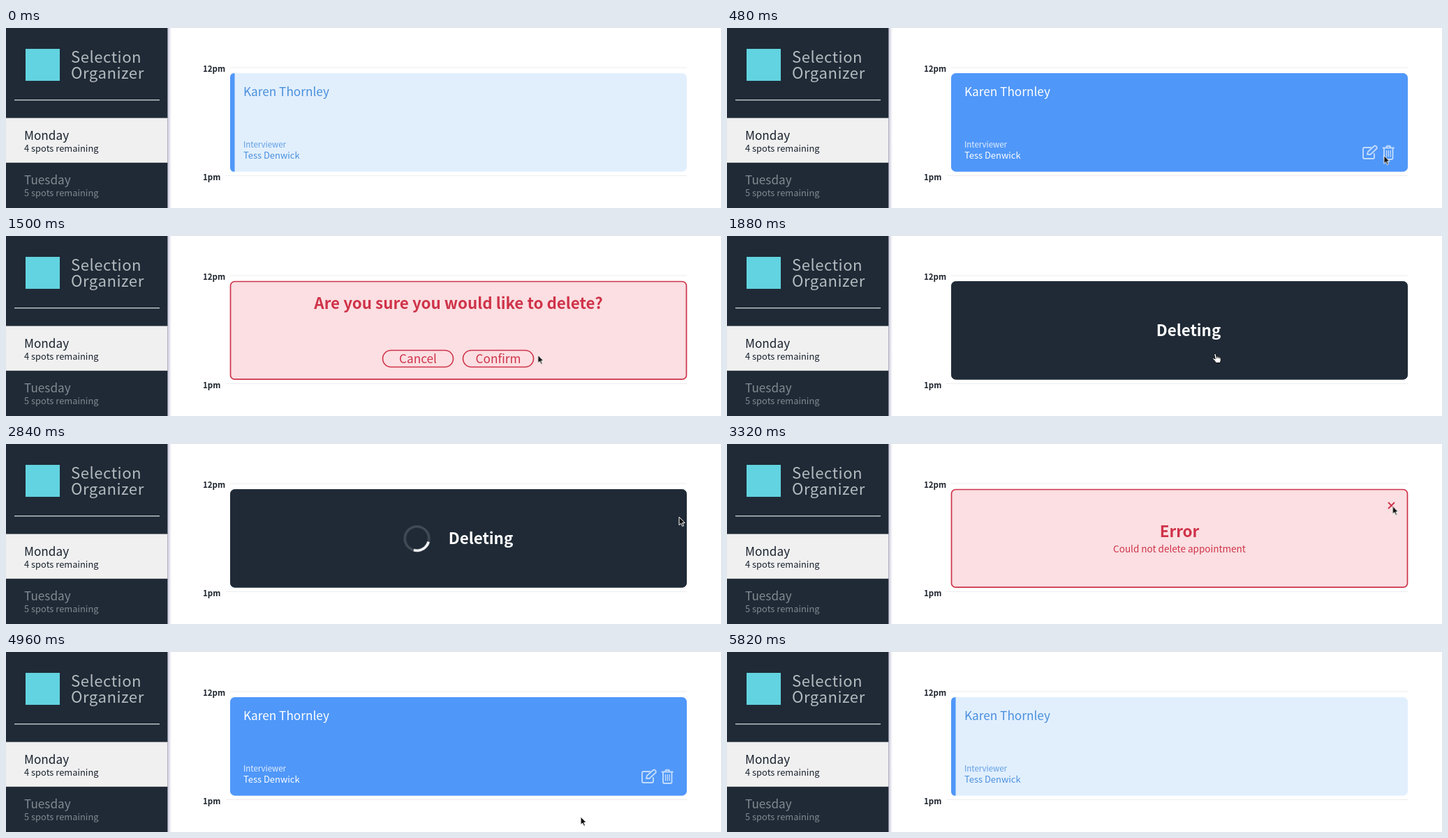
Write an HTML page that moves like this. It is 1024 px wide and 259 px high and loops after 5840 ms.

```html
<!DOCTYPE html>
<html lang="en">
<head>
<meta charset="utf-8">
<title>Interview booking</title>
<style>
  html, body { margin: 0; width: 100%; height: 100%; overflow: hidden; background: #fff; }
  svg { display: block; width: 100vw; height: 100vh; }
  text { font-family: "Noto Sans CJK JP", "Noto Sans CJK SC", "Noto Sans CJK", "Open Sans", sans-serif; font-size: 17.2px; }
  .brand { font-size: 22.2px; font-weight: 300; letter-spacing: .5px; fill: #b4babf; }
  .day { font-size: 17.2px; }
  .spots { font-size: 12.9px; }
  .hour { font-size: 11.5px; font-weight: 700; fill: #1b222b; }
  .title { font-size: 22.35px; font-weight: 600; }
  .label { font-size: 11.45px; font-weight: 300; }
  .person { font-size: 12.95px; }
  .mid { text-anchor: middle; }
  .rest { fill: #4a8fdd; }
  .hover { fill: #fff; }
  .alert { fill: #cf3349; }
  .icon { fill: none; stroke: #fff; stroke-width: 1.9; stroke-linejoin: round; stroke-linecap: round; opacity: .65; }
  .pointer { stroke-width: 1; stroke-linejoin: round; }
  #stage > g { opacity: 0; }
</style>
</head>
<body>
<svg viewBox="0 0 1024 259" preserveAspectRatio="none">
  <defs>
    <linearGradient id="shade">
      <stop offset="0" stop-color="#c8c5da"/>
      <stop offset="1" stop-color="#fff"/>
    </linearGradient>
  </defs>

  <rect x="231" width="6" height="259" fill="url(#shade)"/>
  <rect width="231.4" height="259" fill="#1f2a36"/>
  <rect x="28" y="30" width="49" height="46" fill="#62d3e0"/>
  <text class="brand" x="93" y="50">Selection</text>
  <text class="brand" x="93" y="73">Organizer</text>
  <path d="M12 103.6H220" stroke="#d5d9dd" stroke-width="1.3"/>
  <rect y="129.5" width="231.4" height="64.3" fill="#f0f0f0"/>
  <g fill="#18222e">
    <text class="day" x="26" y="161">Monday</text>
    <text class="spots" x="26" y="178">4 spots remaining</text>
  </g>
  <g fill="#828990">
    <text class="day" x="26" y="225">Tuesday</text>
    <text class="spots" x="26" y="242">5 spots remaining</text>
  </g>

  <text class="hour" x="282" y="62.5">12pm</text>
  <text class="hour" x="282" y="218.5">1pm</text>
  <path d="M321 57H975M315 212.5H975" stroke="#ececec"/>

  <g id="stage"></g>
</svg>

<script>
const LOOP = 5840;
const stage = document.getElementById('stage');

const card = (fill, border) =>
  `<rect x="321.5" y="65.5" width="653" height="140.7" rx="6" fill="${fill}"
    stroke="${border || fill}" stroke-width="${border ? 1.7 : 1}"/>`;

const booking = state => `<g class="${state}">
  <text x="340" y="98">Karen Thornley</text>
  <text class="label" x="340" y="171.7" opacity=".85">Interviewer</text>
  <text class="person" x="340" y="188">Tess Denwick</text></g>`;

const button = (x, label) => `
  <rect x="${x}" y="164.5" width="101" height="24" rx="12" fill="none" stroke="#cf3349" stroke-width="1.6"/>
  <text class="alert mid" x="${x + 50.5}" y="183">${label}</text>`;

function add(markup) {
  const g = document.createElementNS('http://www.w3.org/2000/svg', 'g');
  g.innerHTML = markup;
  stage.append(g);
  return g;
}

const play = (el, frames, duration = LOOP) =>
  el.animate(frames, { duration, iterations: Infinity });

// Visible only inside the given [from, to] spans, with hard switches.
function show(el, ...spans) {
  const on = t => spans.some(([from, to]) => t >= from && t < to) ? 1 : 0;
  const times = [...new Set([0, ...spans.flat(), LOOP])];
  play(el, times.map(t => ({ offset: t / LOOP, opacity: on(t % LOOP), easing: 'step-end' })));
}

const T = { enter: 300, ask: 760, remove: 1850, spin: 1930, fail: 3300, back: 3920, icons: 3990, leave: 4990 };

show(add(card('#e1effd') +
  '<path d="M327.5 65H327Q321 65 321 71V200.7Q321 206.7 327 206.7H327.5Z" fill="#4f97f8"/>' +
  booking('rest')), [0, T.enter], [T.leave, LOOP]);

show(add(card('#4f97f9') + booking('hover')), [T.enter, T.ask], [T.back, T.leave]);

show(add(`<g class="icon">
  <path d="M922 172H913Q911 172 911 174V186Q911 188 913 188H925Q927 188 927 186V181"/>
  <path d="M917 182L918 178L927 169.8Q928.5 169 930 170.5T930.5 173.5L921.5 182Z"/>
  <path d="M939.5 172.5H955M944 172L945 169.8H949.5L950.5 172M941 173V187Q941 189 943 189H951.5Q953.5 189 953.5 187V173"/>
  <path d="M944.5 176.5V185M947.3 176.5V185M950.1 176.5V185" stroke-width="1.4"/></g>`),
  [T.enter, T.ask], [T.icons, T.leave]);

show(add(card('#fbdfe2', '#cf3349') +
  '<text class="title alert mid" x="648" y="105">Are you sure you would like to delete?</text>' +
  button(539.5, 'Cancel') + button(654.5, 'Confirm')), [T.ask, T.remove]);

show(add(card('#1f2a36')), [T.remove, T.fail]);
const deleting = x => add(`<text class="title hover mid" x="${x}" y="144">Deleting</text>`);
show(deleting(661), [T.remove, T.spin]);
show(deleting(680), [T.spin, T.fail]);

const spinner = add(`<g transform="translate(588.5 136)" fill="none" stroke-width="3.6">
  <circle r="17.3" stroke="#414b56"/>
  <path d="M17.3 0A17.3 17.3 0 0 1 0 17.3" stroke="#fff"/></g>`);
show(spinner, [T.spin, T.fail]);
const turn = 600, phase = 15 - 2840 % turn / turn * 360;
play(spinner.querySelector('path'),
  [{ transform: `rotate(${phase}deg)` }, { transform: `rotate(${phase + 360}deg)` }], turn);

show(add(card('#fbdfe2', '#cf3349') +
  '<text class="title alert mid" x="648" y="134">Error</text>' +
  '<text class="alert mid" x="648" y="156" style="font-size:13.5px">Could not delete appointment</text>' +
  '<path d="M947 84L956 93M956 84L947 93" stroke="#cf3349" stroke-width="1.8"/>'), [T.fail, T.back]);

// Cursor: time, x, y of the hotspot.
const route = [
  [0, 838, 262], [120, 838, 262], [560, 948, 178], [1240, 948, 178], [1640, 699, 169],
  [2200, 699, 169], [2700, 964, 105], [3000, 964, 105], [3450, 951, 86], [4250, 951, 86],
  [4420, 963, 104], [4920, 823, 237], [LOOP, 823, 237]
];
const cursor = add(`<g class="pointer">
  <path d="M0 0V11.6L2.7 9.2L4.7 13.4L6.6 12.5L4.7 8.5H8.2Z" fill="#111" stroke="#fff"/>
  <path d="M-1.3 1.2Q0 -.6 1.2 1L2 4.5Q3.6 3.6 4.4 4.9Q5.8 4.2 6.5 5.5Q8 5.2 8.2 6.7L8.3 10L7.3 13.5H1.6Q-1 10 -3.6 7.6Q-3.2 6 -1.2 7.2L.2 8Z
    M2 4.5L2.4 7M4.4 4.9L4.7 7M6.5 5.5L6.6 7.3" fill="#fff" stroke="#111"/></g>`);
show(cursor, [120, 5080]);
play(cursor.firstElementChild, route.map(([t, x, y]) =>
  ({ offset: t / LOOP, transform: `translate(${x}px, ${y}px)`, easing: 'ease-in-out' })));

const [arrow, hand] = cursor.querySelectorAll('path');
show(arrow, [0, 500], [1290, 1540], [2220, 3360], [4270, LOOP]);
show(hand, [500, 1290], [1540, 2220], [3360, 4270]);
</script>
</body>
</html>
```
